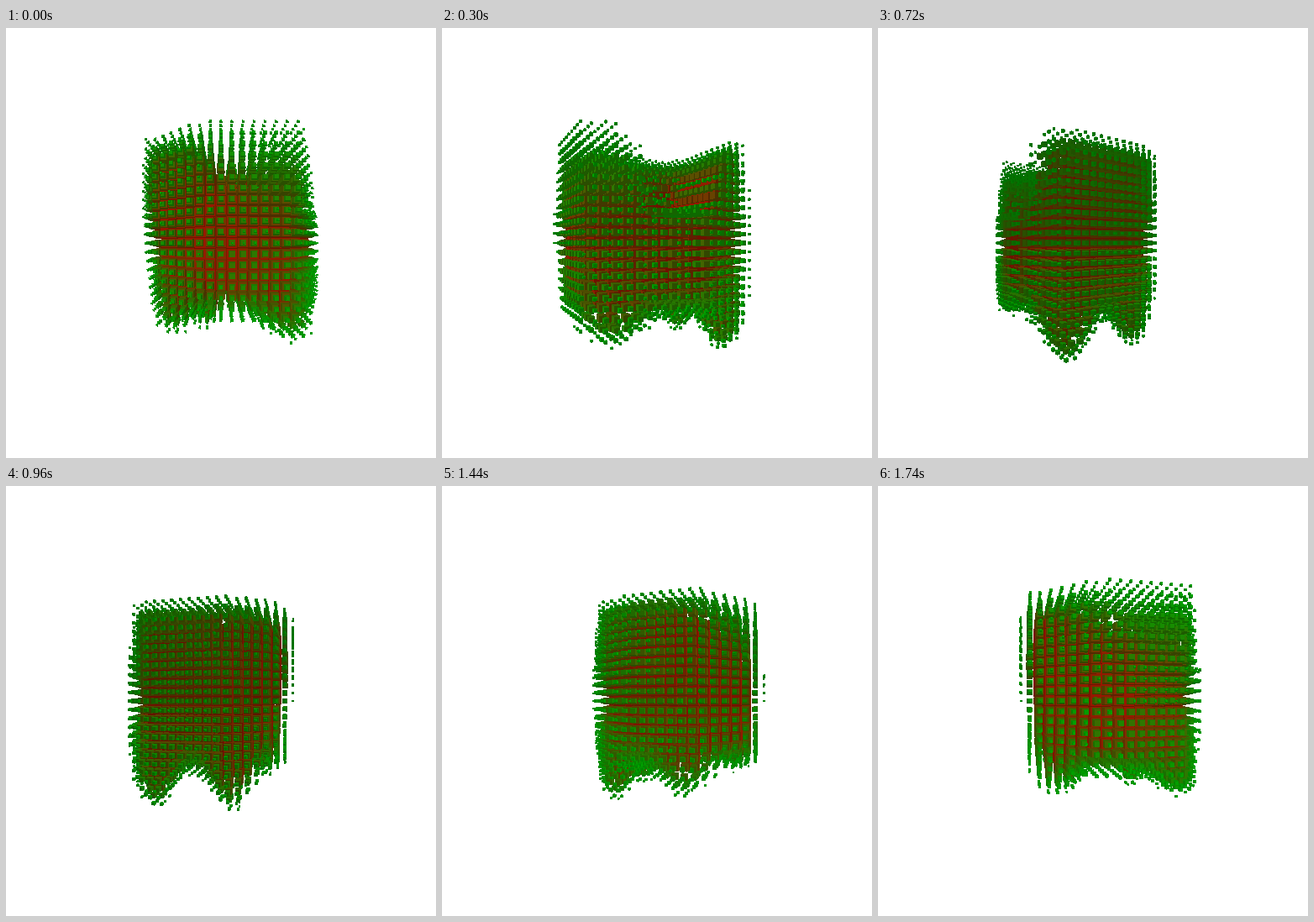
Recreate the animation shown at these times as a matplotlib script. Size 512x512 px, loop 1800 ms.

```python
import numpy as np
import matplotlib.pyplot as plt
from matplotlib.animation import FuncAnimation
from matplotlib.collections import PolyCollection

SIZE, FRAMES, INTERVAL = 512, 30, 60
FOCAL = 380.0      # camera distance, equal to the focal length in pixels
STEP = 9.3         # grid spacing

# Side planes: azimuth in degrees, distance from the axis, lean per unit height
SIDES = [(0, 121, .02), (36, 137, 0), (60, 121, 0), (72, 110, -.02),
         (110, 105, 0), (165, 87, 0), (177, 77, 0), (210, 74, .02),
         (222, 77, .02), (245, 79, .03), (271, 84, .06), (284, 89, .07),
         (318, 99, .06), (340, 112, .04)]
# Tips below the body: position, extra depth
TIPS = [(-44, 63, 50), (-43, -20, 48), (83, 65, 24), (43, -48, 28)]
# Places with a steeper density
HOT = [(25, 92, -6), (36, -77, 40), (104, -15, -8)]
# Brightness of faces by axis: negative side, positive side
LIGHT = np.array([(.43, .63), (.53, .46), (.46, .58)])


def soft(x):
    return 1 / (1 + np.exp(-np.clip(x, -40, 40)))


def density(a, b, y):
    """Depth below the surface, in grid steps."""
    side = np.full(a.shape, np.inf)
    for deg, dist, lean in SIDES:
        t = np.radians(deg)
        bulge = 8 * (y / 110) ** 2
        gap = dist - bulge + lean * y - a * np.cos(t) - b * np.sin(t)
        side = np.minimum(side, gap)

    notch = soft((a + 18) / 5) * soft((60 - a) / 6) * soft((b - 5) / 6)
    thin = soft((a - 25) / 12) * soft((b + 25) / 20)
    top = (105 - 70 * notch - y) * (.8 - .55 * thin * (1 - notch))

    floor = 70
    for ta, tb, extra in TIPS:
        floor = floor + extra * np.exp(-((a - ta) ** 2 + (b - tb) ** 2) / 700)
    bottom = (y + floor) * .65

    boost = 1
    for ha, hb, hy in HOT:
        d2 = (a - ha) ** 2 + (b - hb) ** 2 + (y - hy) ** 2
        boost = boost + .55 * np.exp(-d2 / 1800)
    return np.minimum(np.minimum(side, top), bottom) / STEP * boost


axis = np.arange(-15, 16) * STEP
grid = np.meshgrid(axis, axis, axis, indexing="ij")
field = density(*grid)
slope = np.stack(np.gradient(field), -1)
keep = (field > 0) & (field < 4.6)

pos = np.stack([g[keep] for g in grid], -1)
depth = field[keep]
normal = -slope[keep]
normal /= np.linalg.norm(normal, axis=1, keepdims=True) + 1e-9
half = np.minimum(.15 + .3 * depth, 1) * STEP / 2
heat = np.clip((depth - .5) / 2.7, 0, .85)
color = np.stack([1.1 * heat, 1 - heat, 0 * heat], -1)


def faces(p, h, cam):
    """The three camera-facing sides of each cube."""
    sign = np.where(cam > p, 1, -1)
    quads = np.empty((len(p), 3, 4, 3))
    for k in range(3):
        u, v = [i for i in range(3) if i != k]
        quads[:, k] = p[:, None]
        quads[:, k, :, k] += (sign[:, k] * h)[:, None]
        quads[:, k, :, u] += h[:, None] * np.array([-1, 1, 1, -1])
        quads[:, k, :, v] += h[:, None] * np.array([-1, -1, 1, 1])
    light = LIGHT[np.arange(3), (sign > 0).astype(int)]
    return quads, light


def project(q, c, s):
    a, b, y = q[..., 0], q[..., 1], q[..., 2]
    scale = FOCAL / (FOCAL - a * c - b * s)
    return np.stack([SIZE / 2 + (b * c - a * s) * scale,
                     SIZE / 2 + y * scale], -1)


fig = plt.figure(figsize=(SIZE / 100, SIZE / 100), dpi=100, facecolor="white")
ax = fig.add_axes([0, 0, 1, 1])
ax.set(xlim=(0, SIZE), ylim=(0, SIZE))
ax.axis("off")
cubes = PolyCollection([], linewidths=0, edgecolors="none", antialiaseds=False)
ax.add_collection(cubes, autolim=False)


def draw(i):
    turn = 2 * np.pi * i / FRAMES
    c, s = np.cos(turn), np.sin(turn)
    cam = FOCAL * np.array([c, s, 0])
    ray = cam - pos
    dist = np.linalg.norm(ray, axis=1)
    facing = (ray * normal).sum(1) / dist
    seen = np.flatnonzero((depth < 1.2) | (facing > -.25))
    seen = seen[np.argsort(-dist[seen])]

    quads, light = faces(pos[seen], half[seen], cam)
    shade = color[seen][:, None] * light[..., None]
    cubes.set_verts(project(quads, c, s).reshape(-1, 4, 2))
    cubes.set_facecolor(np.clip(shade, 0, 1).reshape(-1, 3))
    return [cubes]


anim = FuncAnimation(fig, draw, frames=FRAMES, interval=INTERVAL,
                     init_func=lambda: [cubes], repeat=True, repeat_delay=0)
plt.show()
```
